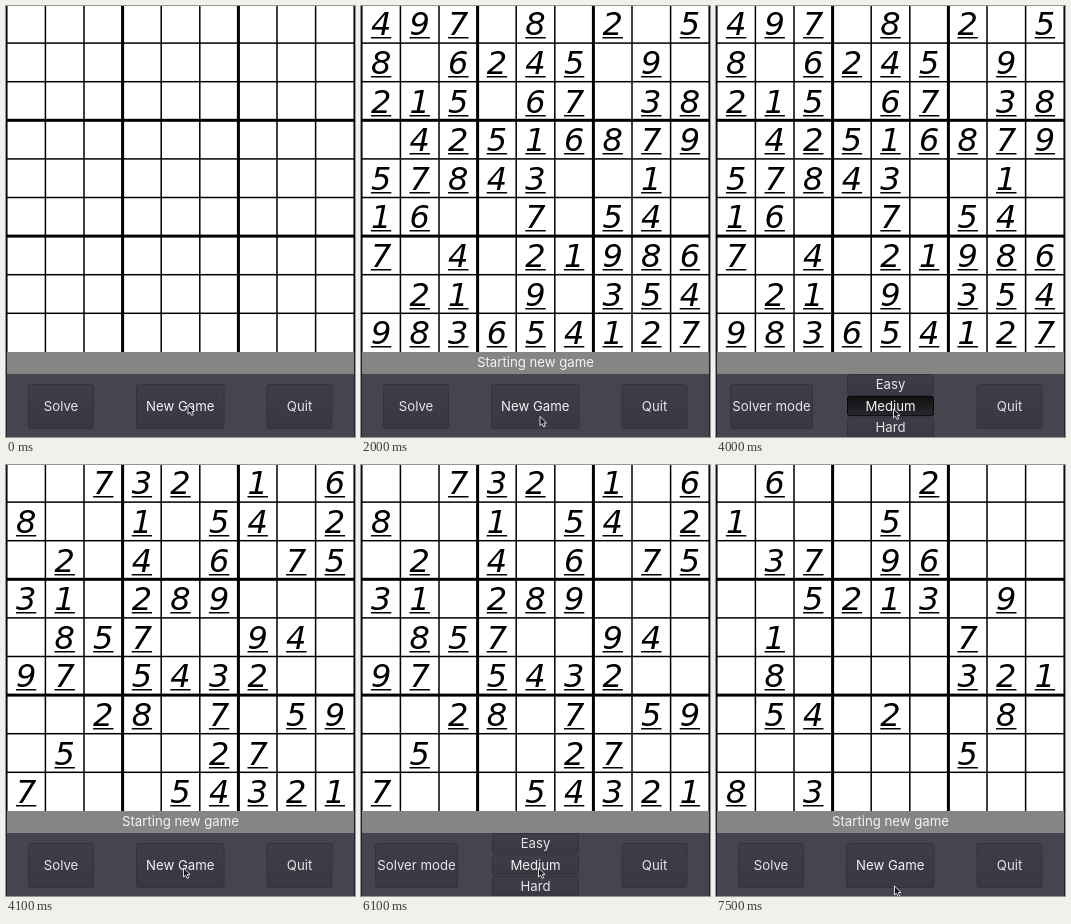
These frames come from a looping animation (349x431 px, 8000 ms). An HTML page with a canvas:

```html
<!DOCTYPE html>
<html lang="en">
<head>
<meta charset="utf-8">
<title>Sudoku</title>
<style>
  html, body { margin: 0; width: 100%; height: 100%; overflow: hidden; background: #46434e; }
  canvas { display: block; width: 349px; height: 431px; }
</style>
</head>
<body>
<canvas id="stage" width="349" height="431"></canvas>
<script>
const ctx = document.getElementById('stage').getContext('2d');
const W = 349, H = 431, LOOP = 8000;
const CELL = 38.6, LEFT = 0.8, TOP = -1.5;

const EASY = '497.8.2.5 8.6245.9. 215.67.38 .42516879 57843..1. 16..7.54. 7.4.21986 .21.9.354 983654127';
const MEDIUM = '..732.1.6 8..1.54.2 .2.4.6.75 31.289... .857..94. 97.5432.. ..28.7.59 .5...27.. 7...54321';
const HARD = '.6...2... 1...5.... .37.96... ..5213.9. .1....7.. .8....321 .54.2..8. ......5.. 8.3......';

// Each list holds [start time, value]; a value holds until the next start.
const boards = [[0, ''], [1200, EASY], [4100, MEDIUM], [7500, HARD]];
const messages = [[0, ''], [1200, 'Starting new game'], [3300, ''],
  [4100, 'Starting new game'], [6100, ''], [7500, 'Starting new game']];
const menus = [[0, false], [500, true], [1200, false], [3100, true],
  [4100, false], [5500, true], [7500, false]];
const presses = [[0, ''], [400, 'New Game'], [500, ''], [1100, 'Easy'], [1200, ''],
  [4000, 'Medium'], [4100, ''], [5400, 'New Game'], [5500, ''], [7300, 'Hard'], [7500, '']];
const pointer = [[0, [182, 399]], [600, [182.5, 389]], [700, [182.5, 379.5]],
  [1600, [182, 384]], [1700, [181, 391]], [1800, [180, 399]], [1900, [179.5, 406]],
  [2000, [179, 410.5]], [3300, [177.5, 403]], [6500, [178, 408]],
  [6600, [178.5, 414]], [6800, [178.5, 421]]];

const at = (track, t) => track.filter(([start]) => start <= t).pop()[1];

function rect(x, y, w, h, fill) {
  ctx.fillStyle = fill;
  ctx.fillRect(x, y, w, h);
}

function label(text, x, baseline, color = '#e6e5e8') {
  ctx.font = '13.2px Inter, sans-serif';
  ctx.textAlign = 'center';
  ctx.fillStyle = color;
  ctx.fillText(text, x, baseline);
}

function button(text, x, y, w, h, pressed, hover) {
  const shade = ctx.createLinearGradient(0, y, 0, y + h);
  shade.addColorStop(0, pressed ? '#101012' : '#403d49');
  shade.addColorStop(1, pressed ? '#29282d' : '#393742');
  ctx.beginPath();
  ctx.roundRect(x + 0.5, y + 0.5, w - 1, h - 1, 2);
  ctx.fillStyle = shade;
  ctx.fill();
  ctx.lineWidth = 1;
  ctx.strokeStyle = pressed ? '#09090a' : hover ? '#35323f' : '#34323b';
  ctx.stroke();
  label(text, x + w / 2, y + h / 2 + 4.7, hover || pressed ? '#f2f2f4' : undefined);
}

function drawGrid() {
  rect(0, 0, W, 346, '#fff');
  for (let i = 0; i <= 9; i++) {
    const size = i % 3 === 0 && i % 9 ? 3 : 1.5;
    rect(LEFT + i * CELL - size / 2, 0, size, 346, '#000');
    if (i < 9) rect(0, TOP + i * CELL - size / 2, W, size, '#000');
  }
}

function drawDigits(board) {
  ctx.font = 'italic 32px "DejaVu Sans", sans-serif';
  ctx.textAlign = 'center';
  board.split(' ').forEach((row, r) => [...row].forEach((digit, c) => {
    if (digit === '.') return;
    const x = LEFT + (c + 0.5) * CELL;
    const y = Math.round(29.3 + r * CELL);
    ctx.fillStyle = '#000';
    ctx.fillText(digit, x, y);
    rect(x - 10.2, y + 2, 20.4, 1.5, '#000');
  }));
}

function drawControls(menuOpen, pressed, [px, py]) {
  rect(0, 368, W, H - 368, '#47444f');
  if (menuOpen) {
    button('Solver mode', 14, 378, 83, 45);
    ['Easy', 'Medium', 'Hard'].forEach((name, i) => {
      const y = 368 + i * 21.6;
      const hover = py >= y && py < y + 21.6;
      button(name, 131, y, 87, 20.6, pressed === name, hover);
    });
  } else {
    button('Solve', 22, 378, 66, 45);
    button('New Game', 130, 378, 88.5, 45, pressed === 'New Game', py >= 378 && py < 423);
  }
  button('Quit', 260.5, 378, 66, 45);
}

function drawPointer([x, y]) {
  const outline = [[0, 0], [0, 9], [2, 7.2], [3.7, 10.5], [5.3, 9.7], [3.8, 6.6], [6.5, 6.4]];
  ctx.beginPath();
  outline.forEach(([dx, dy]) => ctx.lineTo(x + dx, y + dy));
  ctx.closePath();
  ctx.fillStyle = '#17161a';
  ctx.fill();
  ctx.lineWidth = 0.9;
  ctx.strokeStyle = '#eee';
  ctx.stroke();
}

function draw(t) {
  const tip = at(pointer, t);
  drawGrid();
  drawDigits(at(boards, t));
  rect(0, 346, W, 22, '#858585');
  label(at(messages, t), 174.5, 361, '#f3f3f3');
  drawControls(at(menus, t), at(presses, t), tip);
  rect(0, 346, 1, H - 346, '#222126');
  rect(W - 1, 346, 1, H - 346, '#222126');
  drawPointer(tip);
}

function tick() {
  draw(performance.now() % LOOP);
  requestAnimationFrame(tick);
}
tick();
</script>
</body>
</html>
```
